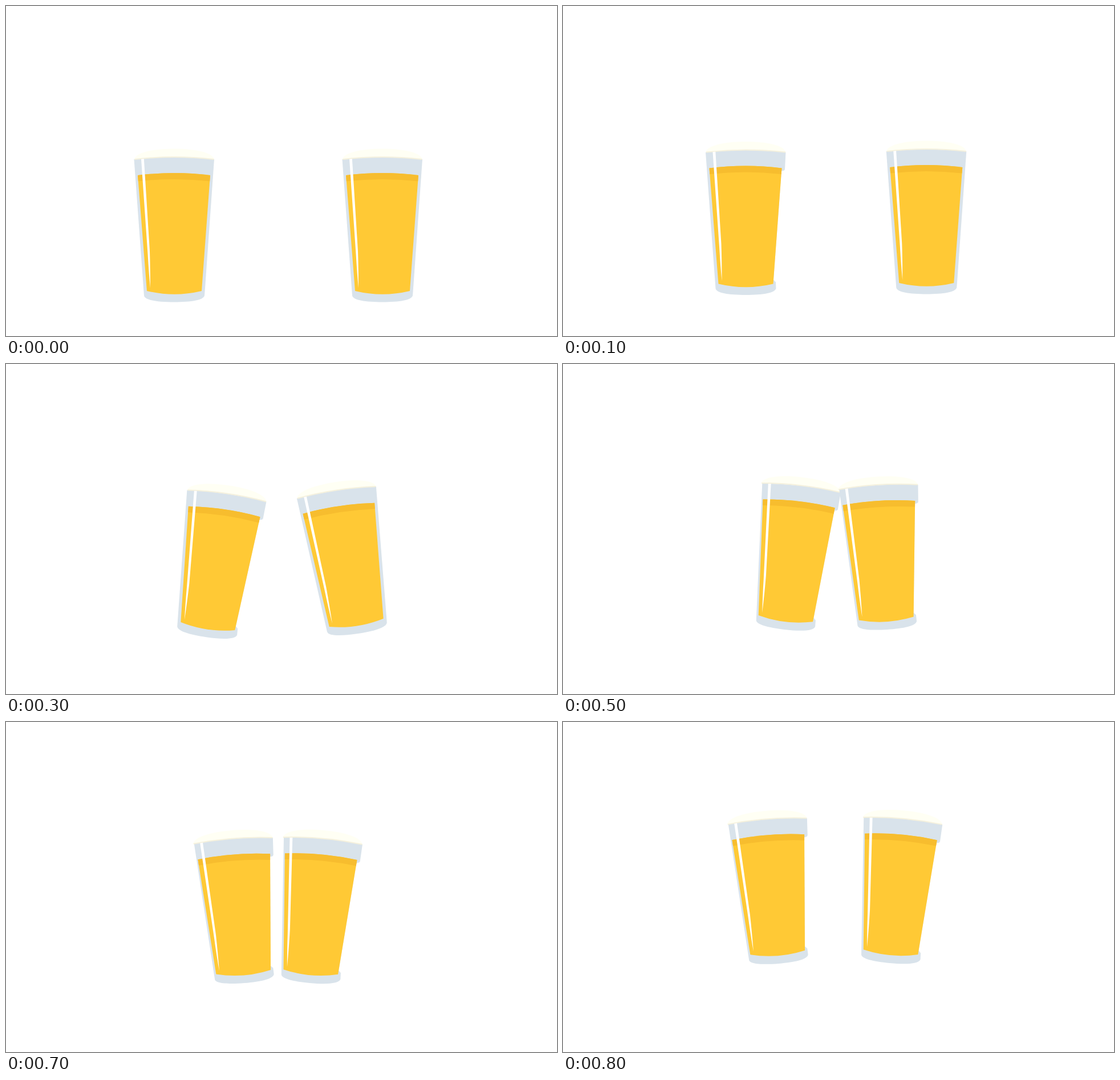
Recreate the animation shown at these times as an HTML page. Size 966x579 px, loop 0.9 s.

```html
<!DOCTYPE html>
<html lang="en">
<head>
<meta charset="utf-8">
<title>Cheers</title>
<style>
  html, body { margin: 0; width: 100%; height: 100%; overflow: hidden; background: #fff; }
  svg { display: block; width: 966px; height: 579px; }
</style>
</head>
<body>
<svg id="stage" viewBox="0 0 966 579" xmlns="http://www.w3.org/2000/svg">
  <defs>
    <g id="beer">
      <path fill="#ffc935" d="M231 297Q295 289 358 297L343 500Q295 511.500 247 500Z"/>
      <path fill="#f7bd2e" d="M231 297Q295 289 358 297L357.200 307.500Q295 300.500 231.800 307.500Z"/>
      <path fill="#fffff4" d="M224.500 269C228 257 257 250.500 295 250.500S361 257 365 268.500Q295 259.500 224.500 269Z"/>
      <path fill="none" stroke="#f5f1dd" stroke-width="2" d="M225.500 269Q295 261 364.500 269"/>
      <path fill="#fff" d="M237 268.500L241.800 268L252 430Q253 460 253 495Q250.500 470 248.500 435Z"/>
    </g>
  </defs>
</svg>
<script>
const STEP = 100, LOOP_STEPS = 9, CLINK = 4;

function svg(tag, attributes, parent) {
  const node = document.createElementNS("http://www.w3.org/2000/svg", tag);
  for (const name in attributes) node.setAttribute(name, attributes[name]);
  return parent.appendChild(node);
}

function glassPath(wallHidden, inset) {
  const wall = wallHidden
    ? "L363.5 299Q363 302 357.500 302L343.500 493L347.500 497"
    : "L349 495";
  return `M${224.5 + inset} 269Q295 262 365 269${wall}L348 508` +
    `C346 516 325 519.500 295 519.500S243 516 ${242 + inset} 508Z`;
}

// Linear blend between the key poses around a beat
function poseAt(keys, beat) {
  const next = keys.find(key => key.beat >= beat);
  const last = keys[Math.max(0, keys.indexOf(next) - 1)];
  const part = next === last ? 0 : (beat - last.beat) / (next.beat - last.beat);
  const mix = name => last[name] + (next[name] - last[name]) * part;
  return { x: mix("x"), y: mix("y"), tilt: mix("tilt") };
}

function makeGlass(wallHiddenFrom, keys) {
  const group = svg("g", {}, document.getElementById("stage"));
  const body = svg("path", { fill: "#d9e3eb" }, group);
  svg("use", { href: "#beer" }, group);
  return beat => {
    const { x, y, tilt } = poseAt(keys, beat);
    group.setAttribute("transform",
      `translate(${x} ${y}) rotate(${tilt}) translate(-294.75 -398.5)`);
    body.setAttribute("d", glassPath(beat >= wallHiddenFrom, beat >= CLINK ? 2 : 0));
  };
}

// Rest, lift, lean, clink, rebound, part
const glasses = [
  makeGlass(1, [
    { beat: 0, x: 294.75, y: 398.5, tilt: 0 },
    { beat: 1, x: 320.25, y: 386, tilt: 0 },
    { beat: 3, x: 368.25, y: 359.5, tilt: 8.3 },
    { beat: CLINK, x: 402, y: 345.75, tilt: 6.7 },
    { beat: 6, x: 408, y: 337.5, tilt: -4.5 },
    { beat: 7, x: 368, y: 303.3, tilt: -4.5 }
  ]),
  makeGlass(CLINK, [
    { beat: 0, x: 659.75, y: 398.5, tilt: 0 },
    { beat: 1, x: 637, y: 384.5, tilt: 0 },
    { beat: 3, x: 598.75, y: 353.5, tilt: -8.6 },
    { beat: CLINK, x: 560.25, y: 345.25, tilt: -3.5 },
    { beat: 6, x: 543.25, y: 337.4, tilt: 5.2 },
    { beat: 7, x: 583.5, y: 302.5, tilt: 5.2 }
  ])
];
const start = performance.now();

function draw() {
  const step = Math.floor((performance.now() - start) / STEP) % LOOP_STEPS;
  const beat = step < CLINK ? step : step - 1; // the lean is held for two steps
  glasses.forEach(pose => pose(beat));
  requestAnimationFrame(draw);
}
draw();
</script>
</body>
</html>
```
